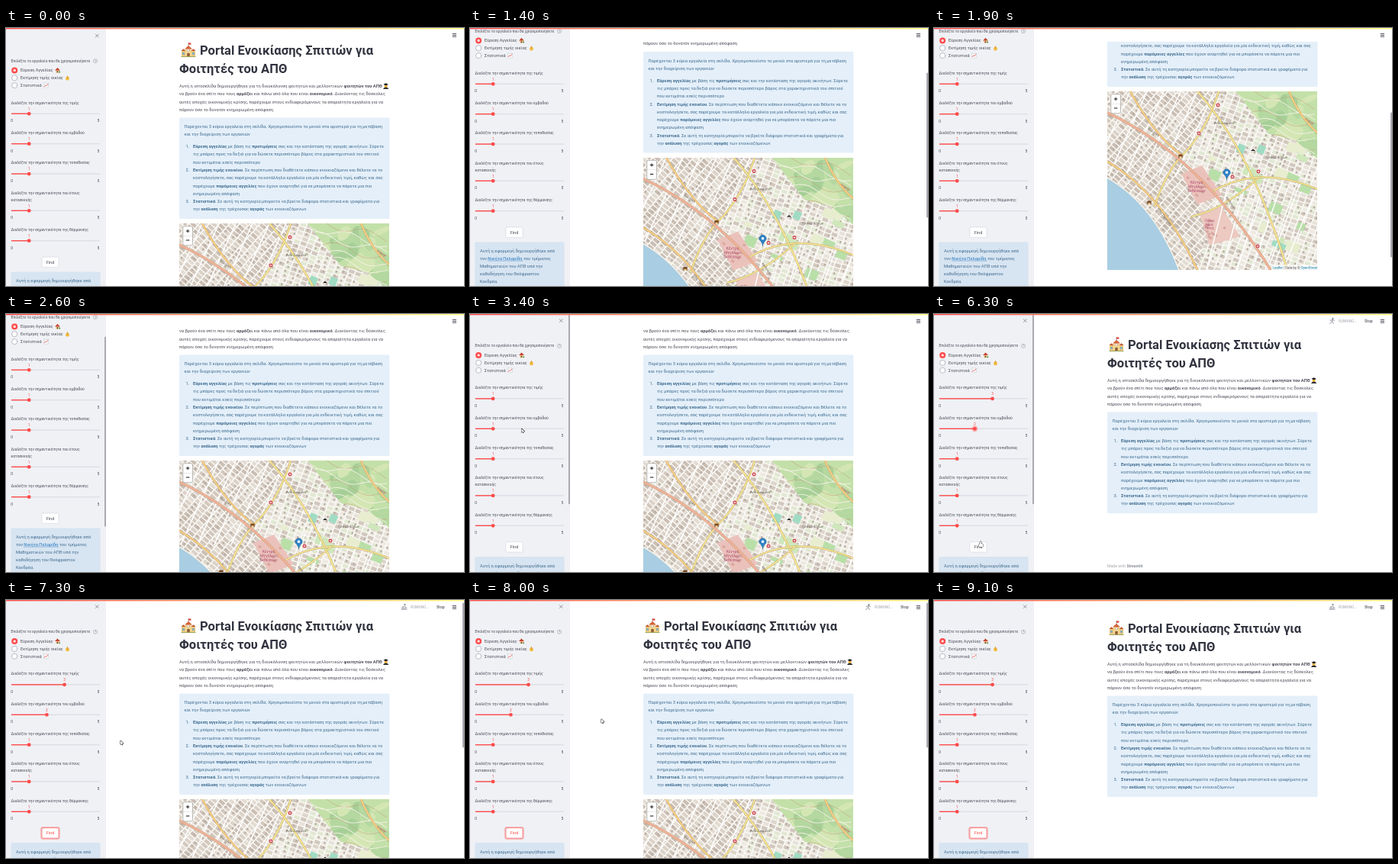
An HTML page with a canvas that plays this animation: 600x338 px, repeating every 9200 ms.

```html
<!DOCTYPE html>
<html lang="el">
<head>
<meta charset="utf-8">
<title>Portal</title>
<style>
html, body { margin: 0; width: 100%; height: 100%; overflow: hidden; background: #fff; }
canvas { display: block; width: 600px; height: 338px; }
</style>
</head>
<body>
<canvas id="stage"></canvas>
<script>
const W = 600, H = 338, LOOP = 9200, STEP = 100;
const RED = '#ff4b4b', INK = '#31333f', SOFT = '#474953', BLUE = '#3b698e', LINK = '#1f73bd';
const FACE = 'Roboto, "Open Sans", sans-serif';
const BODY = 5.73, SMALL = 5, LEAD = 10.27;
const MAP_W = 275, MAP_H = 234;
const canvas = document.getElementById('stage');
const dpr = Math.max(1, window.devicePixelRatio || 1);
canvas.width = W * dpr;
canvas.height = H * dpr;
let c = canvas.getContext('2d');

// ---------- helpers ----------
// Eased progress from 0 to 1 between two times.
function ease(t, from, to) {
  const k = Math.min(1, Math.max(0, (t - from) / (to - from)));
  return k * k * (3 - 2 * k);
}
function seeded(s) {
  return () => (s = (s * 16807) % 2147483647) / 2147483647;
}
function at(x, y, angle, paint) {
  c.save();
  c.translate(x, y);
  c.rotate(angle);
  paint();
  c.restore();
}
function fill(color) { c.fillStyle = color; c.fill(); }
function stroke(color, width) {
  c.strokeStyle = color;
  c.lineWidth = width;
  c.lineCap = c.lineJoin = 'round';
  c.stroke();
}
function path(...p) {
  c.beginPath();
  for (let i = 0; i < p.length; i += 2) c.lineTo(p[i], p[i + 1]);
}
function line(color, width, ...p) { path(...p); stroke(color, width); }
function area(color, ...p) { path(...p); fill(color); }
function rect(x, y, w, h, color) { c.fillStyle = color; c.fillRect(x, y, w, h); }
function box(x, y, w, h, r, color, edge, width = 0.5) {
  c.beginPath();
  c.roundRect(x, y, w, h, r);
  if (color) fill(color);
  if (edge) stroke(edge, width);
}
function dot(x, y, r, color, edge, width) {
  c.beginPath();
  c.arc(x, y, r, 0, 7);
  if (color) fill(color);
  if (edge) stroke(edge, width);
}
function roof(x, y, half, rise, color) {
  area(color, x - half, y, x, y - rise, x + half, y);
}

// Text set at ten times its size, so that small glyphs keep exact spacing.
function text(s, x, y, size, color, weight = 400, align = 'left') {
  c.save();
  c.translate(x, y);
  c.scale(0.1, 0.1);
  c.font = `${weight} ${size * 10}px ${FACE}`;
  c.textAlign = align;
  c.fillStyle = color;
  c.fillText(s, 0, 0);
  const w = c.measureText(s).width / 10;
  c.restore();
  return x + w;
}
// Parts between ** are bold.
function rich(s, x, y, size, color) {
  s.split('**').forEach((part, i) => {
    if (part) x = text(part, x, y, size, color, i % 2 ? 700 : 400);
  });
  return x;
}

// ---------- map ----------
// Rotated rows of houses with white streets between them, inside the current clip.
function blocks(angle, w, h, tones, seed) {
  const rnd = seeded(seed), reach = 200;
  at(MAP_W / 2, MAP_H / 2, angle, () => {
    rect(-reach, -reach, 2 * reach, 2 * reach, '#fbfaf7');
    for (let x = -reach; x < reach; x += w) {
      const shift = rnd() * h;
      for (let y = -reach; y < reach; y += h) {
        const tone = tones[Math.floor(rnd() * tones.length)];
        rect(x, y + shift, w - 1.5, h - 1.3, tone);
        if (rnd() < 0.5) rect(x + w * rnd() * 0.6, y + shift, w * 0.25, h * 0.5, '#bcb0a5');
      }
    }
  });
}
function within(p, paint) {
  c.save();
  path(...p);
  c.clip();
  paint();
  c.restore();
}
function road(color, width, x0, y0, mx, my, x1, y1) {
  for (const [tone, w] of [['#b79a72', width + 0.8], [color, width]]) {
    c.beginPath();
    c.moveTo(x0, y0);
    c.quadraticCurveTo(mx, my, x1, y1);
    stroke(tone, w);
  }
}
function labels(lines, x, y, size, color, angle = 0) {
  at(x, y, angle, () => {
    lines.forEach((s, i) => text(s, 0, i * size * 1.1, size, color, 400, 'center'));
  });
}

function hill() {
  const rnd = seeded(7);
  rect(0, 0, MAP_W, MAP_H, '#c3e0a9');
  for (let i = 0; i < 26; i++) {
    c.beginPath();
    c.ellipse(175 + rnd() * 100, rnd() * 85, 6 + rnd() * 13, 4 + rnd() * 7, rnd() * 3, 0, 7);
    fill(['#a6cf97', '#b4d8a0', '#d3e6b4'][i % 3]);
  }
  for (let i = 0; i < 11; i++) {
    const y = i * 9 - 8, phase = rnd() * 6;
    c.beginPath();
    for (let x = 160; x <= MAP_W; x += 4) {
      c.lineTo(x, y + (x - 160) * 0.25 + 5 * Math.sin(x / 11 + phase));
    }
    stroke(i % 3 ? '#f5f2e4' : '#c99a78', i % 3 ? 0.9 : 0.5);
  }
}

function pin(x, y) {
  at(x, y, 0, () => {
    c.beginPath();
    c.moveTo(0, 8.2);
    c.quadraticCurveTo(-0.8, 3, -4, 0.6);
    c.arc(0, -1.6, 4.7, 2.7, 0.45);
    c.quadraticCurveTo(0.8, 3, 0, 8.2);
    fill('#2f83c5');
    stroke('#2a669b', 0.5);
    dot(0, -1.8, 1.7, '#fff');
  });
}
function clinic([x, y]) {
  dot(x, y, 2.7, '#c21f28', '#fff', 0.5);
  line('#fff', 0.9, x - 1.2, y, x + 1.2, y);
  line('#fff', 0.9, x, y - 1.2, x, y + 1.2);
}
function gate(x, y) {
  box(x - 2.7, y - 2.5, 5.4, 5, 1, '#7d4a22');
  rect(x - 1.6, y + 0.3, 3.2, 2.2, '#f2d9a8');
}

function paintMap() {
  const rnd = seeded(41);
  blocks(0.35, 9, 6, ['#ddd5cb', '#e8e3da', '#d2c8be', '#e2e8d3', '#eeeae2'], 29);
  within([0, 0, 150, 0, 98, 84, 140, 140, 118, MAP_H, 0, MAP_H], () => {
    blocks(0.72, 10, 5.6, ['#d3c8bd', '#dbd2c8', '#cabeb3', '#e3dcd3'], 11);
  });

  // parks and courts between the houses
  for (let i = 0; i < 24; i++) {
    const tone = ['#cfe7bb', '#e8edcf', '#b9dfa9', '#a0dcc3'][i % 4];
    at(118 + rnd() * 140, 62 + rnd() * 135, 0.4, () => {
      box(0, 0, 7 + rnd() * 13, 5 + rnd() * 10, 1, tone);
    });
  }
  within([168, 0, MAP_W, 0, MAP_W, 88, 246, 64, 212, 56], hill);

  // fairground and the quarter south of it
  area('#ebc2bb', 97, 108, 124, 97, 150, 136, 118, 148);
  area('#ecc9c1', 120, 158, 150, 152, 174, 190, 134, 202);
  for (let i = 0; i < 20; i++) {
    const far = i > 9;
    at((far ? 128 : 104) + rnd() * 28, (far ? 164 : 110) + rnd() * 26, 0.6, () => {
      rect(0, 0, 3 + rnd() * 4, 3, '#d8a7a0');
    });
  }

  // water with its quay
  c.beginPath();
  c.moveTo(0, 114);
  c.quadraticCurveTo(62, 150, 93, MAP_H);
  stroke('#f6f3ec', 3);
  c.lineTo(0, MAP_H);
  fill('#a9cde2');

  // streets
  for (let i = 0; i < 6; i++) {
    line('#fff', 1.6, i * 22 - 20, 110, i * 22 + 30, 0);
    line('#fff', 1.5, 130 + i * 20, MAP_H, 165 + i * 22, 95 + i * 6);
  }
  const yellow = '#f7e88f', amber = '#f9d183', rose = '#f3b29a';
  road(yellow, 1.8, 98, 84, 130, 52, 146, 0);
  road(yellow, 1.8, 62, 150, 78, 104, 98, 84);
  road(yellow, 2, 118, 0, 190, 80, 236, MAP_H);
  road(yellow, 1.6, 140, 130, 200, 96, MAP_W, 128);
  road(yellow, 1.6, 110, 164, 150, 156, 200, 112);
  road(amber, 2, 238, 0, 252, 34, MAP_W, 54);
  road(amber, 2, 0, 92, 72, 134, 118, MAP_H);
  road(amber, 2, 30, 0, 62, 58, 98, 84);
  road(rose, 2.6, 0, 28, 122, 84, 214, MAP_H);

  const plum = '#b0496f', stone = '#5e564f';
  labels(['Κέντρο', 'Μεγάλων', 'Εκθέσεων'], 117, 121, 5, plum);
  labels(['Πάρκο', 'Νέας', 'Πύλης'], 134, 171, 4.4, plum);
  labels(['Άνω Συνοικία'], 153, 43, 4.2, stone);
  labels(['Πλαγιά Κήπων'], 222, 88, 4.2, stone);
  labels(['Κεντρική'], 60, 55, 4, stone, 0.56);
  labels(['Κεντρική'], 160, 146, 4, stone, 0.95);
  labels(['Οδός Παραλίας'], 74, 165, 4, stone, 0.9);
  labels(['Λόφος'], 264, 40, 4.4, '#b7564c', 0.6);

  [[145, 18], [120, 55], [164, 112], [198, 105], [197, 203]].forEach(clinic);
  gate(96, 85);
  gate(55, 146);
  roof(191, 78, 3, 2.5, '#222');
  pin(156.5, 108);

  // controls and credits
  box(4.8, 3.8, 12.6, 25, 1.8, '#fff', '#b4b2ae', 0.9);
  rect(5, 16, 12.2, 0.4, '#ccc');
  for (const y of [10, 22]) line('#111', 0.9, 9.2, y, 13, y);
  line('#111', 0.9, 11.1, 8.1, 11.1, 11.9);
  rect(215, 227.5, 60, 6.5, 'rgba(255,255,255,.75)');
  const x = text('Leaflet', 216.5, 232.4, 4.4, '#0078a8');
  text('OpenStreetMap', text(' | Data by © ', x, 232.4, 4.4, '#444'), 232.4, 4.4, '#0078a8');
}

function makeMap() {
  const sheet = document.createElement('canvas'), main = c, k = 2 * dpr;
  sheet.width = MAP_W * k;
  sheet.height = MAP_H * k;
  c = sheet.getContext('2d');
  c.scale(k, k);
  paintMap();
  c = main;
  return sheet;
}
const map = makeMap();

// ---------- small pictures, drawn around their centre ----------
function school() {
  rect(-9, 0, 18, 8, '#e9c77c');
  rect(-4, -2, 8, 10, '#f3d794');
  for (const x of [-6.5, 6.5]) {
    roof(x, 0.5, 3, 2.8, '#c4532f');
    rect(x - 1.2, 2.5, 2.4, 3, '#73a8c9');
  }
  roof(0, -2, 5, 4.5, '#d5613a');
  line('#6b5a4a', 0.6, 0, -6, 0, -10);
  rect(0, -10, 3.4, 2.2, '#e0413a');
  dot(0, -0.2, 1.6, '#fff', '#8a6a45', 0.4);
  rect(-1.7, 3.5, 3.4, 4.5, '#8c5a35');
  rect(-9.5, 7.6, 19, 1, '#9aa05a');
}
function graduate() {
  roof(0, 4, 3.8, 4, '#2b2b30');
  dot(0, 0, 2.1, '#e9b23c');
  roof(0, -2, 3.4, 1.8, '#222');
  rect(-2, -2.2, 4, 1.2, '#222');
}
function house() {
  rect(-2.4, -0.5, 4.8, 3.6, '#efd3a5');
  roof(0, 0, 3.5, 3.5, '#c8402f');
  rect(-0.9, 0.8, 1.6, 2.3, '#7c4a2a');
  dot(2.7, 2.3, 1.1, '#5d9a45');
}
function moneyBag() {
  dot(0, 1, 2.4, '#f0b93a');
  roof(0, 0, 1.4, 3.4, '#e0a02e');
}
function chart() {
  box(-3, -3, 6, 6, 0.5, '#fafafa', '#b9bec8', 0.4);
  line('#e0453f', 0.7, -2.4, 1.6, -0.8, -0.3, 0.4, 0.7, 2.6, -2.2);
}

// ---------- main column ----------
const intro = [
  'Αυτή η ιστοσελίδα δημιουργήθηκε για τη διευκόλυνση φοιτητών και μελλοντικών **φοιτητών του ΑΠΘ**',
  'να βρούν ένα σπίτι που τους **αρμόζει** και πάνω από όλα που είναι **οικονομικό**. Διανύοντας τις δύσκολες',
  'αυτές εποχές οικονομικής κρίσης, παρέχουμε στους ενδιαφερόμενους τα απαραίτητα εργαλεία για να',
  'πάρουν όσο το δυνατόν ενημερωμένη απόφαση'
];
const lead = [
  'Παρέχονται 3 κύρια εργαλεία στη σελίδα. Χρησιμοποιείστε το μενού στα αριστερά για τη μετάβαση',
  'και την διαχείριση των εργασιών'
];
const tools = [
  ['**Εύρεση αγγελίας** με βάση τις **προτιμήσεις** σας και την κατάσταση της αγοράς ακινήτων. Σύρετε',
   'τις μπάρες προς τα δεξιά για να δώσετε περισσότερο βάρος στα χαρακτηριστικά του σπιτιού',
   'που εκτιμάται εσείς περισσότερο'],
  ['**Εκτίμηση τιμής ενοικίου**. Σε περίπτωση που διαθέτετε κάποιο ενοικιαζόμενο και θέλετε να το',
   'κοστολογήσετε, σας παρέχουμε τα κατάλληλα εργαλεία για μία ενδεικτική τιμή, καθώς και σας',
   'παρέχουμε **παρόμοιες αγγελίες** που έχουν αναρτηθεί για να μπορέσετε να πάρετε μια πιο',
   'ενημερωμένη απόφαση'],
  ['**Στατιστικά**. Σε αυτή τη κατηγορία μπορείτε να βρείτε διάφορα στατιστικά και γραφήματα για',
   'την **ανάλυση** της τρέχουσας **αγοράς** των ενοικιαζόμενων']
];

function mainColumn(scroll, hasMap) {
  c.save();
  c.translate(0, -scroll);
  at(239, 29.5, 0, school);
  text('Portal Ενοικίασης Σπιτιών για', 254, 35, 16.6, INK, 700);
  text('Φοιτητές του ΑΠΘ', 227, 59.3, 16.6, INK, 700);
  intro.forEach((s, i) => {
    const end = rich(s, 227, 78 + i * LEAD, BODY, SOFT);
    if (!i) at(Math.max(494.5, end + 5), 76, 0, graduate);
  });

  box(227, 117.5, 275.5, 132.5, 1.5, '#e4eff9');
  lead.forEach((s, i) => rich(s, 233.5, 131 + i * LEAD, BODY, BLUE));
  let y = 157.2;
  tools.forEach((item, n) => {
    text(`${n + 1}.`, 235.5, y, BODY, BLUE);
    item.forEach(s => {
      rich(s, 245, y, BODY, BLUE);
      y += LEAD;
    });
  });
  if (hasMap) c.drawImage(map, 227, 256, MAP_W, MAP_H);
  c.restore();
}

function footer() {
  text('Streamlit', text('Made with ', 227, 332.3, 5.2, '#a3a6ad'), 332.3, 5.2, '#7c808a', 500);
}

// Small figure that runs, stands or rows while the page works.
function athlete(pose) {
  const ink = '#7d818a', row = pose === 2, lean = pose === 1 ? 0 : 1;
  dot(lean, -3, 1.1, ink);
  if (row) {
    line(ink, 0.8, -2.4, 0.2, 1, -1, 2.6, 0.4);
    for (const y of [1.6, 3.3]) line(ink, 0.8, -3.5, y, 3.5, y);
    return;
  }
  line(ink, 0.8, lean, -1.8, 0, 0.8);
  line(ink, 0.8, -2.6, -lean * 0.6, lean * 0.6, -1.4, 2.8, -0.6);
  line(ink, 0.8, -1 - lean * 2, 3.6, 0, 0.8, 1 + lean, 3.8);
}

function header(t) {
  rect(131, 0, W - 131, 18, '#fff');
  c.save();
  c.globalAlpha = ease(t, 4200, 5200);
  at(521.5, 9, 0, () => athlete(Math.floor(t / 500) % 4));
  text('RUNNING...', 530, 10.9, 4.7, '#a3a6ae');
  text('Stop', 564, 10.9, 5.2, INK);
  c.restore();
  for (let i = 0; i < 3; i++) rect(584.8, 7.1 + i * 1.9, 5.2, 0.9, '#444650');
}

// ---------- sidebar ----------
const options = [
  ['Εύρεση Αγγελίας', house, 67.5],
  ['Εκτίμηση τιμής οικίας', moneyBag, 80.5],
  ['Στατιστικά', chart, 52.5]
];
const topics = ['της τιμής', 'του εμβαδού', 'της τοποθεσίας', 'του έτους\nκατασκευής', 'της θέρμανσης'];
const about = [
  'Αυτή η εφαρμογή δημιουργήθηκε από',
  'τον |Νικήτα Πελαρίδη| του τμήματος',
  'Μαθηματικών του ΑΠΘ υπό την',
  'καθοδήγηση του Θεόφραστου',
  'Κανδρέα.'
];
const valueX = v => 7 + v * 23.2;

// Draws one slider and returns where the next one starts.
function slider(topic, y, value, active) {
  const rows = ('Διαλέξτε την σημαντικότητα ' + topic).split('\n');
  rows.forEach((s, i) => text(s, 6.5, y + 1.6 + i * 8.8, SMALL, SOFT));
  y += (rows.length - 1) * 8.8;
  const x = valueX(value), bar = y + 14.3;
  rect(7, bar - 0.7, 116, 1.4, '#dcdfe5');
  rect(7, bar - 0.7, x - 7, 1.4, RED);
  if (active) dot(x, bar, 3.9, 'rgba(255,75,75,.35)');
  dot(x, bar, 2.4, RED);
  text(value, x, y + 9.6, SMALL, RED, 400, 'center');
  text('0', 6.2, y + 25.4, SMALL, SOFT);
  text('5', 119.5, y + 25.4, SMALL, SOFT);
  return y + 39.4;
}

function sidebar(t, scroll) {
  const pressed = t >= 6700;
  rect(0, 0, 131, H, '#eff1f5');
  c.save();
  c.translate(0, -scroll);
  for (const d of [-1.9, 1.9]) line('#7b7e87', 0.8, 119.3 - d, 8.2, 119.3 + d, 12);
  text('Επιλέξτε το εργαλείο που θα χρησιμοποιήσετε', 6.5, 44.6, 4.85, SOFT);
  dot(117, 43.2, 2.6, null, '#8b8e96', 0.5);
  text('?', 117, 44.8, 4.2, '#777a83', 400, 'center');

  options.forEach(([s, icon, x], i) => {
    const y = 55.4 + i * 9.9;
    if (i) dot(11.2, y, 3.6, '#fff', '#8f929b', 0.6);
    else dot(11.2, y, 2.8, '#fff', RED, 2.4);
    text(s, 19, y + 2, 5.5, SOFT);
    at(x, y, 0, icon);
  });

  const first = 1 + (t >= 4100) + (t >= 4400), second = 1 + (t >= 5700);
  const values = [first, second, 1, 1, 1];
  const focus = t < 3900 || pressed ? -1 : t < 5300 ? 0 : 1;
  topics.reduce((y, s, i) => slider(s, y, values[i], focus === i), 98);

  if (pressed) box(46, 299, 24, 15.4, 2.4, null, 'rgba(255,75,75,.4)', 1.4);
  box(47, 300, 22, 13.4, 1.6, '#fff', pressed ? RED : '#d3d6dd', 0.6);
  text('Find', 58, 308.6, 5.6, pressed ? RED : SOFT, 400, 'center');

  box(6.5, 319.5, 117, 61, 1.5, '#d7e4f1');
  about.forEach((s, i) => {
    const y = 333 + i * 10.1;
    let x = 13;
    s.split('|').forEach((part, k) => {
      const end = text(part, x, y, BODY, k === 1 ? LINK : BLUE);
      if (k === 1) line(LINK, 0.4, x, y + 0.9, end, y + 0.9);
      x = end;
    });
  });
  c.restore();
}

// ---------- pointer ----------
function pointer(t) {
  if (t < 3100 || t > 8600) return;
  const drag1 = ease(t, 3900, 4800), back = ease(t, 4800, 5300), drag2 = ease(t, 5300, 5800);
  const come = ease(t, 3000, 3800), down = ease(t, 5800, 6200), leave = ease(t, 6800, 7500);
  const x = 105 - 75 * come + 46 * (drag1 - back) + 23 * drag2 + 8 * down + 111 * leave;
  const y = 190 - 80 * come + 40 * back + 148 * down - 142 * leave;
  at(x, y, 0, () => {
    c.beginPath();
    if (t >= 3700 && t < 6900) {
      c.roundRect(-0.8, 0, 1.6, 5, 0.8);
      c.roundRect(-2, 3, 5, 4.2, 1.2);
    } else {
      path(0, 0, 0, 5.2, 1.3, 4.1, 2.4, 6, 2.1, 3.8, 3.8, 3.7);
      c.closePath();
    }
    stroke('#222', 1);
    fill('#fff');
  });
}

// ---------- scene ----------
function mainScroll(t) {
  if (t >= 9100) return -8;
  if (t >= 7200) return -5;
  if (t >= 4900) return -11;
  return 173 * ease(t, 1000, 1800) - 109 * ease(t, 2000, 2500) - 13 * ease(t, 4300, 4400);
}

function draw(t) {
  c.setTransform(dpr, 0, 0, dpr, 0, 0);
  rect(0, 0, W, H, '#fff');
  const scroll = mainScroll(t);
  const side = 39 * ease(t, 200, 900) - 37.6 * ease(t, 2700, 3200);
  const short = t >= 4900 && t < 7200;
  mainColumn(scroll, !short && t < 9100);
  if (short) footer();
  header(t);
  sidebar(t, side);

  const thumb = '#a9abb0';
  if ((t >= 1000 && t < 2500) || (t >= 7200 && t < 8800)) {
    box(598, (scroll + 11) * 0.6, 2, 190, 1, thumb);
  }
  if ((t >= 200 && t < 1000) || (t >= 2500 && t < 7200)) {
    box(129, (side - 1) * 0.78, 2, 249, 1, thumb);
  }

  const bar = c.createLinearGradient(0, 0, W, 0);
  bar.addColorStop(0, RED);
  bar.addColorStop(1, '#fffd80');
  rect(0, 0, W, 1.4, bar);
  pointer(t);
}

const start = performance.now();
function tick(now) {
  const t = Math.max(0, now - start) % LOOP;
  draw(Math.floor(t / STEP) * STEP);
  requestAnimationFrame(tick);
}
draw(0);
requestAnimationFrame(tick);
</script>
</body>
</html>
```
